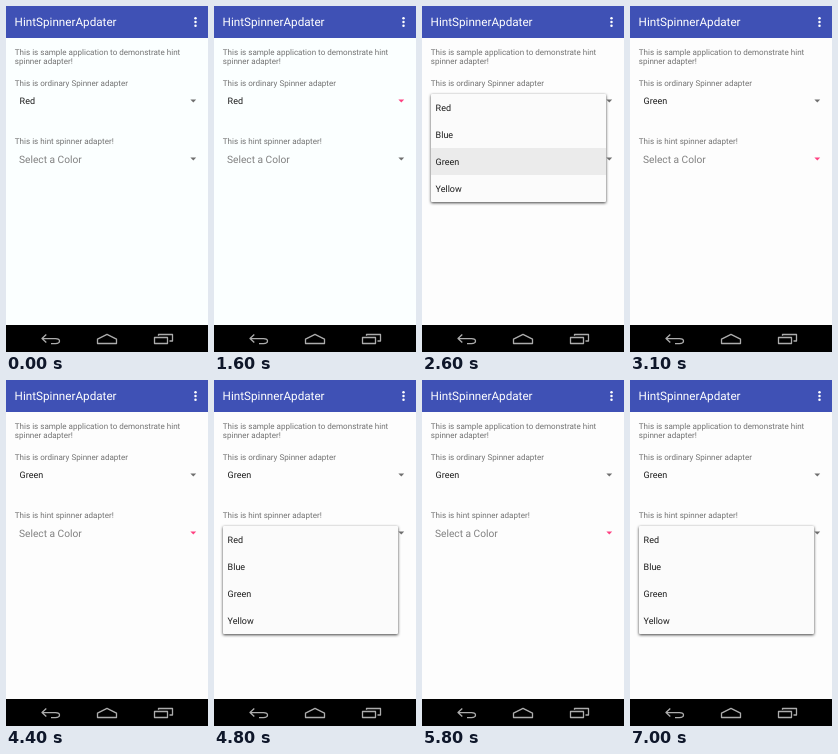
These frames come from a looping animation (202 px wide and 346 px high, 8 s). An HTML page:

```html
<!DOCTYPE html>
<html lang="en">
<head>
<meta charset="utf-8">
<title>Spinner demo</title>
<style>
  html, body { margin: 0; width: 100%; height: 100%; overflow: hidden; background: #fdfdfd; }
  svg { display: block; width: 100vw; height: 100vh; }
  text { font-family: Roboto, sans-serif; font-size: 9px; fill: #1c1c1c; white-space: pre; text-rendering: geometricPrecision; }
  .title { font-size: 11.7px; fill: #fff; }
  .label { font-size: 8.05px; fill: #737373; }
  .hint { font-size: 10.2px; fill: #808080; }
  .nav { fill: none; stroke: #acacac; stroke-width: 1.3; stroke-linejoin: round; }
  .popup { transform-box: fill-box; transform-origin: 50% 0; }
  .panel { fill: #fbfbfb; filter: drop-shadow(0 1.3px 1.6px rgba(0, 0, 0, .75)); }
</style>
</head>
<body>
<svg viewBox="0 0 202 346">
  <rect id="page" width="202" height="346"/>
  <rect width="202" height="32" fill="#3f51b5"/>
  <text class="title" x="8.6" y="20.3">HintSpinnerApdater</text>
  <g fill="#fff">
    <circle cx="189.5" cy="12.3" r="1.25"/>
    <circle cx="189.5" cy="16" r="1.25"/>
    <circle cx="189.5" cy="19.7" r="1.25"/>
  </g>
  <text class="label" x="8.8" y="49">This is sample application to demonstrate hint</text>
  <text class="label" x="8.8" y="58.3">spinner adapter!</text>
  <text class="label" x="8.8" y="80.3">This is ordinary Spinner adapter</text>
  <text id="choice" x="13.6" y="98.2"></text>
  <text class="label" x="8.8" y="138.2">This is hint spinner adapter!</text>
  <text class="hint" x="13" y="157.2">Select a Color</text>
  <path id="arrow1" d="M184.4 93.5h5.8l-2.9 3z"/>
  <path id="arrow2" d="M184.4 151.5h5.8l-2.9 3z"/>
  <rect y="319" width="202" height="27"/>
  <g class="nav">
    <path d="M40.3 328.6l-4.3 4 4.3 4M36.3 332.6h13.2q4 0 4 2.5t-4 2.5h-4.5"/>
    <path d="M91.5 337.5v-4.4l9.5-4.8 9.5 4.8v4.4z"/>
    <path d="M148.5 331.5h13v6h-13zM152.5 329.7v-1.2h14v6.5h-3"/>
  </g>
</svg>
<script>
const LOOP = 8000, STEP = 100, ROW = 27;
const COLORS = ["Red", "Blue", "Green", "Yellow"];
const GREY = "#6f6f6f", PINK = "#ff4081";
const svg = document.querySelector("svg");
const byId = id => document.getElementById(id);

function add(parent, tag, attrs, text = "") {
  const node = document.createElementNS(svg.namespaceURI, tag);
  for (const key in attrs) node.setAttribute(key, attrs[key]);
  node.textContent = text;
  return parent.appendChild(node);
}

function makePopup(top) {
  const group = add(svg, "g", { class: "popup" });
  add(group, "rect", { class: "panel", x: 9, y: top, width: 175, height: ROW * 4, rx: 1 });
  const mark = add(group, "rect", { x: 9, y: top + ROW * 2, width: 175, height: ROW, fill: "#ebebeb" });
  COLORS.forEach((name, i) => add(group, "text", { x: 13.6, y: top + 17.2 + ROW * i }, name));
  return { group, mark };
}

const popups = [makePopup(88), makePopup(146)];

// Each opening and closing is a pair of short decelerating scale-and-fade moves.
const windows = [
  { popup: 0, open: 1800, close: 2700 },
  { popup: 1, open: 4600, close: 5400 },
  { popup: 1, open: 6600, close: Infinity }
];
const OPENING = [[.86, .5], [.97, .9]];
const CLOSING = [[.96, .65], [.85, .25]];

function poseAt(time, { open, close }) {
  if (time < open) return null;
  if (time >= close) return CLOSING[(time - close) / STEP] || null;
  return OPENING[(time - open) / STEP] || [1, 1];
}

const within = (time, from, to) => time >= from && time < to;

function draw(time) {
  byId("page").setAttribute("fill", time < 1900 ? "#fbffff" : "#fdfdfd");
  byId("choice").textContent = time < 2700 ? "Red" : "Green";
  byId("arrow1").setAttribute("fill", within(time, 1600, 1800) ? PINK : GREY);
  const pressed = within(time, 3100, 4600) || within(time, 5800, 6600);
  byId("arrow2").setAttribute("fill", pressed ? PINK : GREY);

  popups.forEach(({ group, mark }, index) => {
    const pose = windows.filter(w => w.popup === index)
      .map(w => poseAt(time, w)).find(Boolean);
    group.style.display = pose ? "" : "none";
    if (pose) {
      group.style.transform = `scale(${pose[0]})`;
      group.style.opacity = pose[1];
    }
    mark.style.display = index === 0 && time >= 2600 ? "" : "none";
  });
}

const start = performance.now();
function tick() {
  const time = (performance.now() - start) % LOOP;
  draw(Math.floor(time / STEP) * STEP);
  requestAnimationFrame(tick);
}
tick();
</script>
</body>
</html>
```
